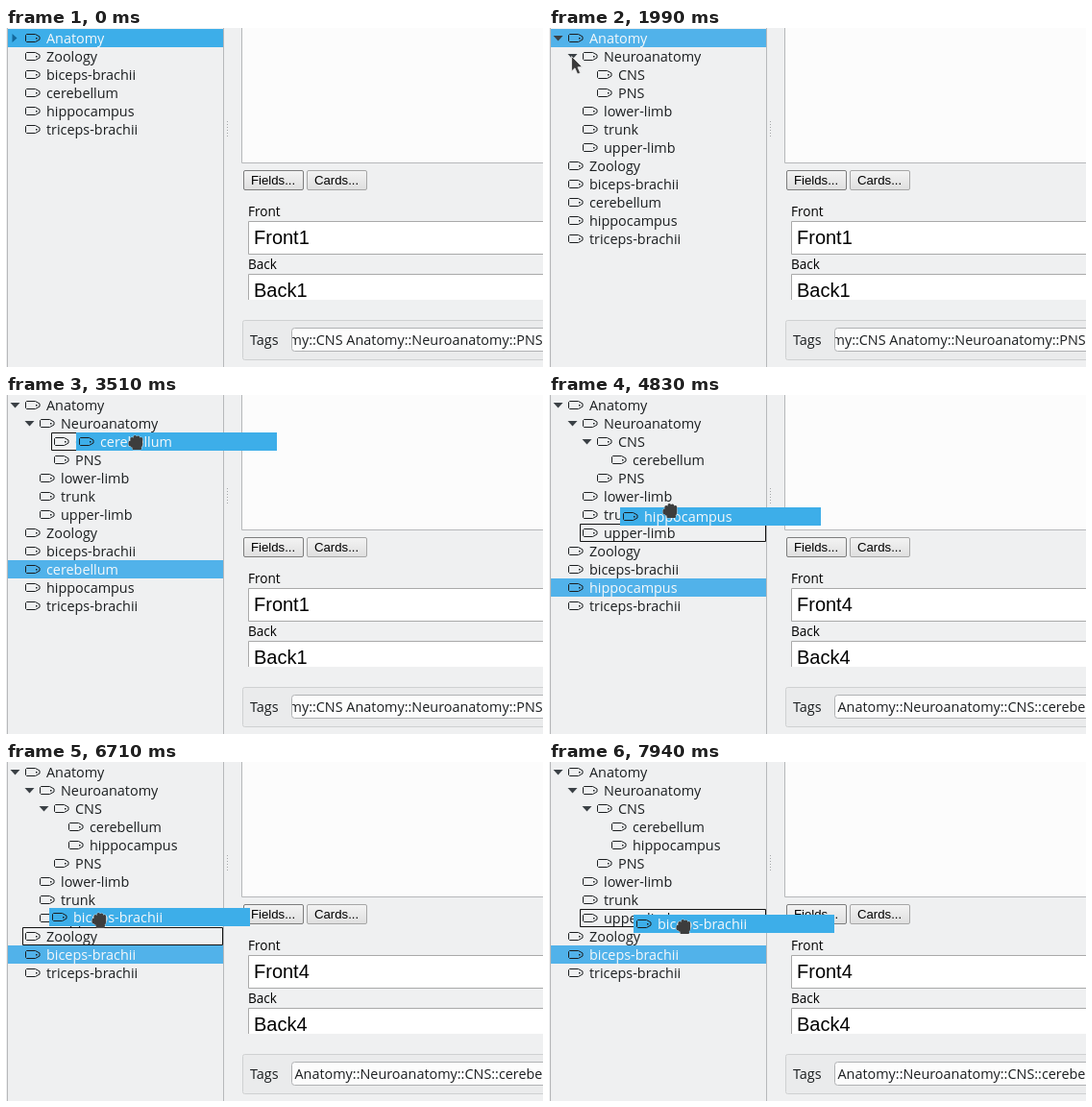
These frames come from a looping animation (559x353 px, 8 s). An HTML page with a canvas:

```html
<!DOCTYPE html>
<html lang="en">
<head>
<meta charset="utf-8">
<title>Tag tree drag and drop</title>
<style>
html, body { margin: 0; width: 100%; height: 100%; overflow: hidden; background: #eff0f1; }
canvas { display: block; }
</style>
</head>
<body>
<canvas id="stage" width="559" height="353"></canvas>
<script>
const g = document.getElementById('stage').getContext('2d');
const LOOP = 8000, ROW = 19, TOP = 1, RIGHT = 226, LAG = 40;
const UI = '"Open Sans", "Noto Sans", sans-serif';
const SANS = '"Liberation Sans", Arial, sans-serif';
const BLUE = '#3daee9', HOVER = '#51b2ea', INK = '#1b1e20', PALE = '#f4f8fa', EDGE = '#b6b8ba';

// Tree states; leading dots give the depth
const roots = ['Zoology', 'biceps-brachii', 'cerebellum', 'hippocampus', 'triceps-brachii'];
const limbs = ['.lower-limb', '.trunk', '.upper-limb'];
const without = (...names) => roots.filter(r => !names.includes(r));
const trees = [
  [0, ['Anatomy', ...roots]],
  [830, ['Anatomy', '.Neuroanatomy', ...limbs, ...roots]],
  [1460, ['Anatomy', '.Neuroanatomy', '..CNS', '..PNS', ...limbs, ...roots]],
  [3910, ['Anatomy', '.Neuroanatomy', '..CNS', '...cerebellum', '..PNS', ...limbs,
    ...without('cerebellum')]],
  [5680, ['Anatomy', '.Neuroanatomy', '..CNS', '...cerebellum', '...hippocampus', '..PNS', ...limbs,
    ...without('cerebellum', 'hippocampus')]]
].map(([t, rows]) => [t, rows.map(s => {
  const name = s.replace(/^\.+/, '');
  return { name, depth: s.length - name.length };
})]);
const picks = [[0, 'Anatomy'], [2780, 'cerebellum'], [4530, 'hippocampus'], [6490, 'biceps-brachii']];
const drags = [
  { from: 3020, to: 3910, x: 79, y: 182 },
  { from: 4570, to: 5680, x: 68.5, y: 194 },
  { from: 6530, to: LOOP, x: 69, y: 203 }
];

// Pointer path: time, x, y, easing into the point
const ease = {
  both: u => u * u * (3 - 2 * u),
  in: u => u * u,
  out: u => 1 - (1 - u) * (1 - u)
};
const path = [
  [90, 143, 311], [620, 9, 4], [1010, 9, 4], [1440, 23, 29], [1990, 23, 29],
  [2760, 79, 182], [3020, 79, 182], [3510, 135, 49], [3910, 135, 49],
  [4390, 67, 204], [4530, 67, 204], [4570, 68.5, 194],
  [4830, 125.5, 121, 'in'], [5130, 141, 40, 'out'], [5250, 139, 46], [5680, 139, 46],
  [5890, 134, 91, 'in'], [6270, 69, 206, 'out'], [6490, 69, 206], [6530, 69, 203],
  [6980, 149, 92], [7070, 151, 103], [7150, 154, 98], [7290, 154, 98],
  [7460, 153, 131], [7640, 153, 131], [7940, 140, 170.5, 'out']
];

const latest = (list, t) => list.filter(e => e[0] <= t).pop()[1];

function pointer(t) {
  const i = path.findIndex(k => k[0] > t);
  if (i <= 0) return path.at(i).slice(1, 3);
  const a = path[i - 1], b = path[i];
  const u = ease[b[3] || 'both']((t - a[0]) / (b[0] - a[0]));
  return [a[1] + (b[1] - a[1]) * u, a[2] + (b[2] - a[2]) * u];
}

function box(x, y, w, h, fill, stroke, r = 0) {
  g.beginPath();
  g.roundRect(x + .5, y + .5, w - 1, h - 1, r);
  if (fill) { g.fillStyle = fill; g.fill(); }
  g.strokeStyle = stroke;
  g.lineWidth = 1;
  g.stroke();
}

function rect(x, y, w, h, fill) {
  g.fillStyle = fill;
  g.fillRect(x, y, w, h);
}

function text(s, x, y, size = 14.4, family = UI, color = INK) {
  g.font = (family === UI ? '500 ' : '') + size + 'px ' + family;
  g.fillStyle = color;
  g.fillText(s, x, y);
}

function clipped(x, y, w, h, paint) {
  g.save();
  g.beginPath();
  g.rect(x, y, w, h);
  g.clip();
  paint();
  g.restore();
}

function trace(points) {
  g.beginPath();
  points.forEach(([x, y]) => g.lineTo(x, y));
  g.closePath();
}

function label(name, x, y, color) {
  const mid = y + 9.5;
  trace([[1.5, -4], [10.5, -4], [15, -1.5], [15, 1.5], [10.5, 4], [1.5, 4], [.5, 3], [.5, -3]]
    .map(p => [x + p[0], mid + p[1]]));
  g.strokeStyle = INK;
  g.lineWidth = 1;
  g.stroke();
  rect(x + 11, mid - .5, 1.5, 1.5, INK);
  text(name, x + 22, y + 15, 14.4, UI, color);
}

function expander(x, y, open) {
  trace(open
    ? [[x, y + 7], [x + 10, y + 7], [x + 5, y + 12.5]]
    : [[x + 2, y + 5], [x + 7, y + 9.5], [x + 2, y + 14]]);
  g.fillStyle = open ? '#3b4146' : '#14699c';
  g.fill();
}

function panels(t) {
  rect(0, 0, 559, 353, '#eff0f1');
  rect(1, 0, 1, 353, EDGE);
  rect(RIGHT, 0, 1, 353, EDGE);
  for (let y = 97; y < 113; y += 3) rect(230, y, 1, 1, '#a5a7a9');

  box(245, -2, 330, 143, '#fcfcfc', EDGE);
  [['Fields...', 247, '#7d7d7d'], ['Cards...', 313, '#a6a6a6']].forEach(([s, x, edge]) => {
    const fill = g.createLinearGradient(0, 148, 0, 169);
    fill.addColorStop(0, '#f4f4f4');
    fill.addColorStop(1, '#dedede');
    box(x, 148, 63, 21, fill, edge, 1.5);
    text(s, x + 8, 163, 13.2, SANS, '#000');
  });

  const n = t < 3950 ? 1 : 4;
  text('Front', 252, 196, 13.6, UI, '#000');
  box(252, 201, 330, 35, '#fff', '#a9a9a9');
  text('Front' + n, 258, 225, 20, SANS, '#000');
  text('Back', 252, 251, 13.6, UI, '#000');
  clipped(246, 250, 313, 33, () => {
    box(252, 256, 330, 35, '#fff', '#a9a9a9');
    text('Back' + n, 258, 280, 20, SANS, '#000');
  });

  box(246, 304, 330, 42, '#eaebec', '#cfd1d2', 2);
  text('Tags', 254, 330);
  box(297, 312, 290, 25, '#fcfcfc', '#b0b2b4', 3);
  clipped(298, 313, 261, 23, () => {
    if (n === 1) text('my::CNS Anatomy::Neuroanatomy::PNS', 294.5, 330);
    else text('Anatomy::Neuroanatomy::CNS::cerebellum', 300.5, 330);
  });
}

function tree(rows, pick, lit) {
  rows.forEach(({ name, depth }, i) => {
    const y = TOP + i * ROW, on = name === pick;
    const open = i + 1 < rows.length && rows[i + 1].depth > depth;
    if (on) rect(2, y, RIGHT - 2, ROW, lit ? HOVER : BLUE);
    if (open || i === 0) expander(4.5 + 15 * depth, y, open);
    label(name, 20 + 15 * depth, y, on ? PALE : INK);
  });
}

// Frame around the row below the pointer, or a line when near its edge
function dropMark(rows, pick, y) {
  const i = Math.floor((y - TOP) / ROW), row = rows[i];
  if (!row || row.name === pick) return;
  const x = 17 + 15 * row.depth, top = TOP + i * ROW, off = y - top;
  if (off < 2) rect(x, top - 1, RIGHT - x, 1, '#111');
  else if (off > ROW - 2) rect(x, top + ROW - 1, RIGHT - x, 1, '#111');
  else box(x, top, RIGHT - x, ROW, null, '#111');
}

function arrow(x, y) {
  trace([[0, 0], [0, 15.5], [3.5, 12.3], [6.2, 18.5], [9, 17.2], [6.4, 11.3], [11, 11]]
    .map(p => [p[0] + x + .5, p[1] + y + .5]));
  g.fillStyle = '#3a3a3a';
  g.fill();
  g.strokeStyle = 'rgba(235,235,235,.8)';
  g.lineWidth = 1;
  g.stroke();
}

function hand(x, y) {
  g.beginPath();
  [[-4, -5], [-.8, -7], [2.4, -6.5], [5.4, -5]].forEach(([dx, dy]) =>
    g.roundRect(x + dx - 1.6, y + dy, 3.4, 9, 1.6));
  g.roundRect(x - 7.5, y - 1.5, 5, 6, 2);
  g.roundRect(x - 5.5, y - 2.5, 12.5, 8.5, 3);
  g.roundRect(x - 3.5, y + 3, 9.5, 5, 1);
  g.strokeStyle = 'rgba(235,235,235,.6)';
  g.lineWidth = 1;
  g.stroke();
  g.fillStyle = '#3d3d3d';
  g.fill();
}

function draw(t) {
  const rows = latest(trees, t), pick = latest(picks, t);
  const [x, y] = pointer(t);
  const drag = drags.find(d => t >= d.from && t < d.to);
  panels(t);
  tree(rows, pick, drag || (pick === 'Anatomy' && t >= 830));
  if (drag) {
    dropMark(rows, pick, pointer(t - LAG)[1]);
    const i = rows.findIndex(r => r.name === pick);
    const px = Math.round(17 + x - drag.x), py = Math.round(TOP + i * ROW + y - drag.y);
    rect(px, py, RIGHT - 17, ROW, BLUE);
    label(pick, px + 3, py, PALE);
    hand(Math.round(x), Math.round(y));
  } else if (t >= 90) {
    arrow(Math.round(x), Math.round(y));
  }
}

const start = performance.now();
function tick() {
  draw((performance.now() - start) % LOOP);
  requestAnimationFrame(tick);
}
tick();
</script>
</body>
</html>
```
